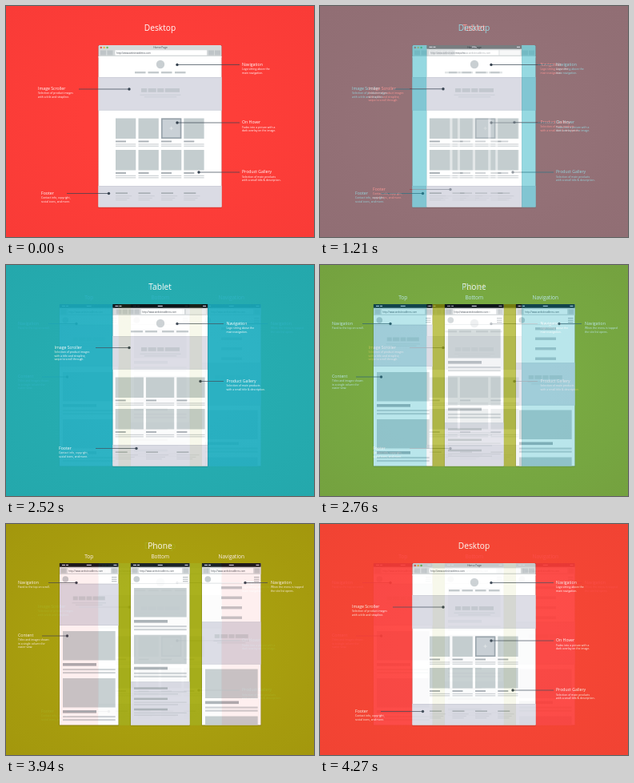
Animation, 385 px wide and 289 px high, one loop 4.3 s. Source, as an HTML page:

```html
<!DOCTYPE html>
<html lang="en">
<head>
<meta charset="utf-8">
<title>Responsive layouts</title>
<style>
html, body { margin: 0; height: 100%; overflow: hidden; background: #fb3d38; }
svg { display: block; width: 100%; height: 100%; }
text { font-family: "Open Sans", "Noto Sans", sans-serif; }
</style>
</head>
<body>
<svg id="stage" viewBox="0 0 385 289"></svg>
<script>
const PIC = '#c4cdcf', BAR = '#a9b0b5', LINE = '#cdd2d5', BAND = '#dadbe4', INK = '#36424f';
const TOP = 49, END = 251.5;

const rect = (x, y, w, h, fill) => `<rect x="${x}" y="${y}" width="${w}" height="${h}" fill="${fill}"/>`;
const dot = (x, y, r, fill) => `<circle cx="${x}" cy="${y}" r="${r}" fill="${fill}"/>`;
const text = (x, y, size, str, extra = 'fill="#fff"') =>
  `<text x="${x}" y="${y}" font-size="${size}" ${extra}>${str}</text>`;
const centered = (x, y, size, str, fill = '#fff') =>
  text(x, y, size, str, `fill="${fill}" text-anchor="middle"`);
const each = (list, fn) => list.map(fn).join('');

// Label with description; the leader runs from x1 to a dot at x2
function note(x, y, title, lines, x1, x2, ly = y + .5) {
  return text(x, y + 1.8, 5.2, title, 'fill="#fff" font-weight="500"') +
    each(lines, (s, i) => text(x, y + 7.1 + i * 4.6, 3.4, s)) +
    rect(Math.min(x1, x2), ly - .35, Math.abs(x2 - x1), .7, INK) + dot(x2, ly, 1.7, INK);
}

const url = x => text(x, 59.6, 2.85, 'http://www.websiteaddress.com', 'fill="#444c54"');

function statusBar(x, w) {
  return rect(x, TOP, w, 4.7, '#0d1519') + rect(x + 3, 50.8, 4, 1.2, '#ccd') +
    rect(x + 8, 50.8, 3, 1.2, '#ccd') + rect(x + w / 2 - 3, 50.8, 6, 1.2, '#ccd') +
    rect(x + w - 6, 50.8, 4, 1.2, '#ccd');
}

function headline(cx, y, w) {
  const parts = [[0, .15], [.18, .21], [.42, .17], [.62, .38]];
  return each(parts, ([a, b]) => rect(cx - w / 2 + a * w, y, b * w, 4.8, '#c3c8cf')) +
    rect(cx - w * .53, y + 7.7, w * 1.06, 1.1, '#cbcfd7') +
    rect(cx - w * .42, y + 10.2, w * .84, 1.1, '#cbcfd7');
}

function band(x, y, w, h) {
  return rect(x, y, w, h, BAND) + rect(x, y, w, .6, '#c6c9d3') +
    (y + h < END ? rect(x, y + h - .6, w, .6, '#c6c9d3') : '');
}

// Page shared by the two wide layouts
function page(x, w, nav, navW, cols, colW) {
  const card = (cx, y) => rect(cx, y, colW, 25.5, PIC) + rect(cx, y + 28, 13, 1.9, BAR) +
    rect(cx, y + 31.8, colW, 1.2, LINE) + rect(cx, y + 34.2, colW, 1.2, LINE);
  return rect(x, 63, w, END - 63, '#fff') + dot(193, 73, 5.2, '#c9cfd2') +
    each(nav, n => rect(n, 82, navW, 2.4, '#c4cacd')) +
    band(x, 89, w, 41.5) + headline(193, 103, 48) +
    each([140.5, 180], y => each(cols, c => card(c, y))) +
    band(x, 225, w, END - 225) +
    each(cols, c => rect(c, 233.3, 15, 1.7, BAR) +
      each([237.3, 239.8, 242.3], (y, i) => rect(c, y, colW * (.8 - i * .12), .9, '#c6cad2')));
}

function slide(id, color, edge, title, body) {
  return `<radialGradient id="${id}Bg" r=".7"><stop offset=".35" stop-color="${color}"/>` +
    `<stop offset="1" stop-color="${edge}"/></radialGradient><g id="${id}">` +
    rect(0, 0, 385, 289, `url(#${id}Bg)`) + centered(192.5, 31, 10.2, title) + body + '</g>';
}

const shadow = (x, w) => `<rect x="${x - .6}" y="${TOP}" width="${w + 1.2}" height="${END - TOP + 1}" rx="1" fill="#000" opacity=".22"/>`;

function desktop() {
  const x = 115.5, w = 154;
  return shadow(x, w) +
    `<rect x="${x}" y="${TOP}" width="${w}" height="16" rx="1.5" fill="#d5d9da"/>` +
    each(['#e9594e', '#e8b44a', '#69b85a'], (c, i) => dot(118.8 + i * 3.9, 52, 1.2, c)) +
    centered(193, 53.2, 3.3, 'Home Page', '#444c54') +
    each([118, 126.5, 253, 261], b => rect(b, 55.5, 7, 6, '#bfc5c8')) +
    rect(136.5, 55.3, 114.5, 6.3, '#fff') + url(138) +
    page(x, w, [161, 177.5, 194, 211], 13.5, [137, 165.5, 194, 222.3], 25.3) +
    '<rect x="194.8" y="141.3" width="23.7" height="23.9" fill="#c9d0d6" stroke="#97a2aa" stroke-width="1.6"/>' +
    rect(204.5, 152.6, 4.4, .8, '#e6eaec') + rect(206.3, 150.8, .8, 4.4, '#e6eaec') +
    note(295, 73, 'Navigation', ['Logo sitting above the', 'main navigation.'], 292, 214) +
    note(40, 103, 'Image Scroller', ['Selection of product images', 'with a title and strapline.'], 91, 154, 104) +
    note(295, 145.5, 'On Hover', ['Fades into a picture with a', 'dark overlay on the image.'], 292, 214) +
    note(295, 207.5, 'Product Gallery', ['Selection of main products', 'with a small title &amp; description.'], 292, 241) +
    note(44, 234, 'Footer', ['Contact info, copyright,', 'social icons, and more.'], 76, 128.5);
}

function tablet() {
  const x = 133.5, w = 118.5;
  return shadow(x, w) + rect(x, 53, w, 10, '#d8dcde') + statusBar(x, w) +
    each([138, 145.5, 153, 160.5], b => rect(b, 55.5, 6.5, 6, '#c1c7ca')) +
    rect(169, 55.3, 54, 6.3, '#fff') + url(170.3) + rect(225, 55.3, 25, 6.3, '#eef0f1') +
    page(x, w, [156, 174, 195, 213], 15, [136.7, 175, 213.4], 35.2) +
    note(275.5, 73, 'Navigation', ['Logo sitting above the', 'main navigation.'], 272, 214) +
    note(60.5, 103, 'Image Scroller', ['Selection of product images', 'with a title and strapline,', 'swipe to scroll through.'], 112, 154) +
    note(275.5, 145, 'Product Gallery', ['Selection of main products', 'with a small title &amp; description.'], 272, 243) +
    note(66, 229, 'Footer', ['Contact info, copyright,', 'social icons, and more.'], 112, 163);
}

function handset(x, label, body) {
  const w = 73.5;
  return centered(x + w / 2, 43.2, 6.5, label) + shadow(x, w) +
    rect(x, TOP, w, END - TOP, '#fff') + rect(x, 53, w, 10, '#d8dcde') + statusBar(x, w) +
    each([1.8, 65.5], d => rect(x + d, 55.5, 6.4, 6, '#c1c7ca')) +
    rect(x + 10, 55.3, 54, 6.3, '#fff') + url(x + 11.3) +
    dot(x + 7.3, 69, 3.8, '#c3cacd') +
    each([66, 68.6, 71.2], y => rect(x + 65, y, 6.5, 1.1, '#b0b7bb')) +
    rect(x, 74.5, w, .5, '#d3d7da') + body;
}

function post(x, y) {
  return rect(x + 4, y, 65.7, Math.min(36.5, END - y), PIC) + (y > 220 ? '' :
    rect(x + 4, y + 40, 42, 3.6, BAR) + rect(x + 4, y + 47, 65.7, 2.2, LINE) +
    rect(x + 4, y + 51, 65.7, 2.2, LINE));
}

function phone() {
  const [a, b, c] = [67, 156, 245], w = 73.5;
  return handset(a, 'Top', band(a, 75, w, 52) + headline(a + w / 2, 90.5, 40) +
      post(a, 134) + post(a, 193)) +
    handset(b, 'Bottom', post(b, 80) + post(b, 138.7) + band(b, 197.5, w, END - 197.5) +
      each([204.3, 217.5, 230.7], y => rect(b + 4, y, 42, 2.6, BAR) +
        rect(b + 4, y + 5, 65.7, 1.3, '#c6cad2') + rect(b + 4, y + 7.8, 55, 1.3, '#c6cad2'))) +
    handset(c, 'Navigation', each([78, 90.5, 103, 115.5], y => rect(c + 24, y, 26, 3.4, '#c3c9cd')) +
      band(c, 122.5, w, 53) + headline(c + w / 2, 138, 42) + post(c, 181.5) + post(c, 240.5)) +
    note(15, 73, 'Navigation', ['Fixed to the top on scroll.'], 53, 88) +
    note(15, 139, 'Content', ['Titles and images shown', 'in a single column for', 'easier view.'], 45, 76.5, 140) +
    note(331, 73, 'Navigation', ['When the menu is tapped', 'the site list opens.'], 327, 299);
}

document.getElementById('stage').innerHTML =
  slide('desktop', '#fe3e39', '#f93b37', 'Desktop', desktop()) +
  slide('tablet', '#1caec0', '#1aa9bb', 'Tablet', tablet()) +
  slide('phone', '#a3ab0c', '#9c9f0a', 'Phone', phone());

const [tabletLayer, phoneLayer] = ['tablet', 'phone'].map(id => document.getElementById(id));

// Cross-fade progress in 13 steps of 30 ms
const fade = (t, start) => Math.max(0, Math.min(13, Math.floor((t - start) / 30) + 1)) / 13;

function draw(now) {
  const t = now % 4300, back = fade(t, 3940);
  tabletLayer.setAttribute('opacity', back ? 0 : fade(t, 1060));
  phoneLayer.setAttribute('opacity', back ? 1 - back : fade(t, 2520));
}

let start;
function tick(now) {
  start ??= now;
  draw(now - start);
  requestAnimationFrame(tick);
}
draw(0);
requestAnimationFrame(tick);
</script>
</body>
</html>
```
